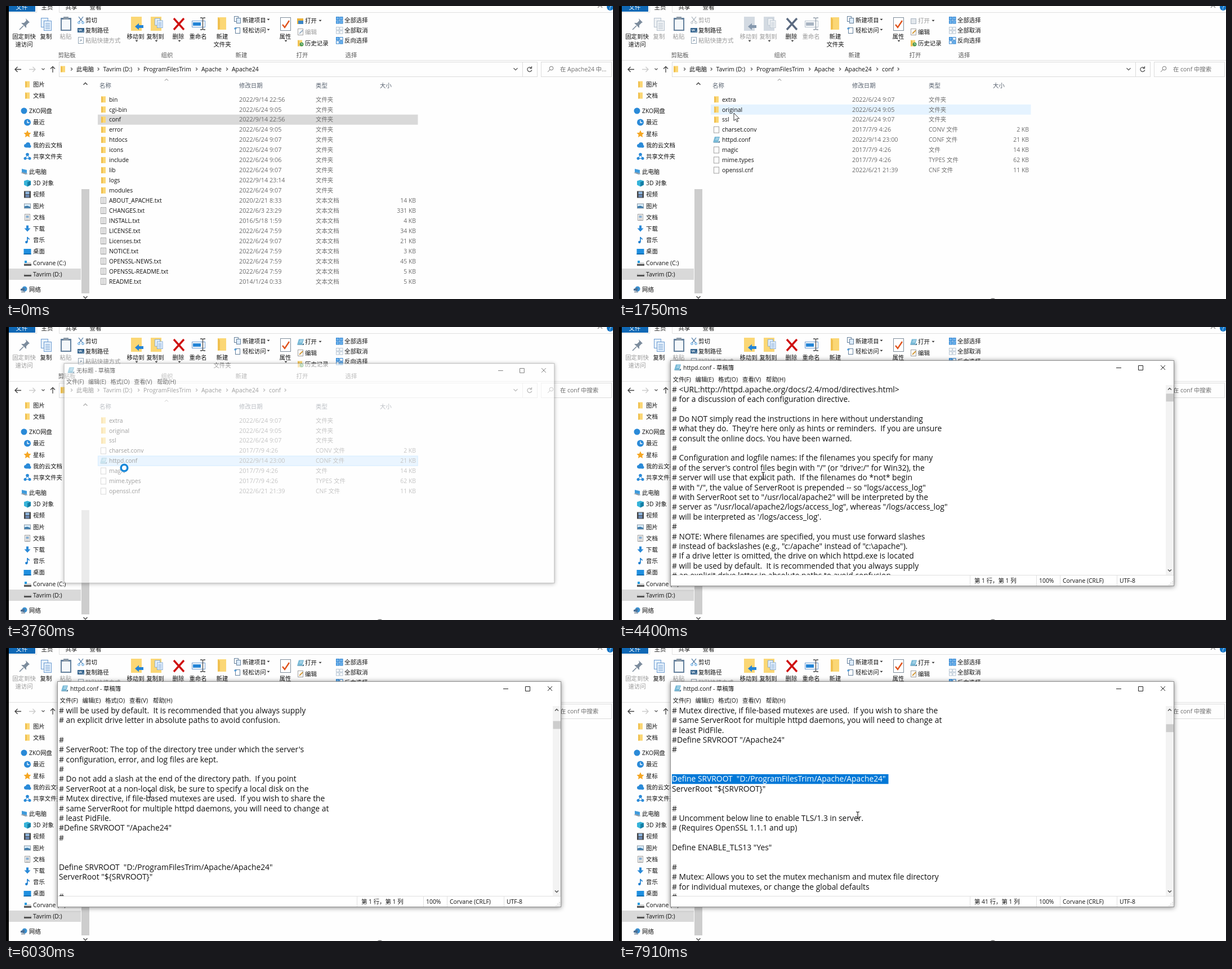
An HTML page that plays this animation: 1078 px wide and 520 px high, repeating every 8000 ms.

```html
<!DOCTYPE html>
<html lang="zh-CN">
<head>
<meta charset="utf-8">
<style>
html, body { margin: 0; width: 100%; height: 100%; overflow: hidden; background: #fefefe; }
svg { display: block; }
text { font: 10.4px "Open Sans", "Noto Sans CJK SC", "Noto Sans CJK", sans-serif; white-space: pre; }
.date { font-size: 10.8px; }
.code text { font-size: 13.85px; }
.shadow { filter: drop-shadow(0 1px 4px #0007); }
</style>
</head>
<body>
<svg width="1078" height="520" viewBox="0 0 1078 520">
  <g id="base"></g><g id="ribbon"></g><g id="files"></g>
  <g id="arrows"></g><g id="pad"></g><g id="cursor"></g>
</svg>
<script>
const INK = '#111', GREY = '#6d6d6d', DIM = '#9a9a9a', BLUE = '#2a8ad8', GOLD = '#fbd775';

// SVG helpers; text is placed by the middle of its capitals
const esc = s => s.replace(/&/g, '&amp;').replace(/</g, '&lt;');
const T = (x, y, s, fill = INK, more = '') => `<text x="${x}" y="${y + 3.8}" fill="${fill}" ${more}>${esc(s)}</text>`;
const C = (x, y, s, fill) => T(x, y, s, fill, 'text-anchor="middle"');
const R = (x, y, w, h, fill, more = '') => `<rect x="${x}" y="${y}" width="${w}" height="${h}" fill="${fill}" ${more}/>`;
const B = (x, y, w, h, stroke, fill = 'none') => R(x + .5, y + .5, w - 1, h - 1, fill, `stroke="${stroke}"`);
const P = (d, stroke, w = 1, fill = 'none') => `<path d="${d}" stroke="${stroke}" stroke-width="${w}" fill="${fill}"/>`;
const F = (d, fill) => `<path d="${d}" fill="${fill}"/>`;
const O = (x, y, r, fill, more = '') => `<circle cx="${x}" cy="${y}" r="${r}" fill="${fill}" ${more}/>`;
const at = (x, y, s, more = '') => `<g transform="translate(${x} ${y})${more}">${s}</g>`;
const chevron = (x, y, turn, size = 3, color = '#555', w = 1.2) =>
  at(x, y, P(`M${-size / 2} ${-size}L${size / 2} 0L${-size / 2} ${size}`, color, w), ` rotate(${turn})`);
const drop = (x, y, fill = '#333') => F(`M${x - 2.5} ${y - 1.2}h5l-2.5 2.7z`, fill);

const folder = R(-4, -5.5, 8, 11, GOLD) + F('M-4 -5.5l3 1.5v9l-3 .5z', '#f0c050');
const page = B(-5, -6, 10, 12, '#a0a0a0', '#fff');
const lined = page + P('M-3 -3.5h6M-3 -1.5h6M-3 .5h6M-3 2.5h6M-3 4.5h6', '#a8a8a8', .8);
const notebook = F('M-3 -5.5h9l-3 10h-9z', '#78b9d6') + F('M-6 4.5l9 0 3 -3v3.500h-10z', '#426f8c') + P('M-1 -3h5M-2 -.5h5', '#d9f0fa');
const cloud = O(-3, 1, 3, BLUE) + O(1, -1, 4, BLUE) + O(4, 2, 2.5, BLUE) + R(-3, 0, 7, 4.3, BLUE);
const disk = F('M-6 1l2 -3h9l2 3v3h-13z', '#555') + F('M-6 1l2 -3h9l2 3z', '#d4d4d4');
const icons = {
  folder, cloud,
  dot: O(0, 0, 5.5, BLUE),
  clock: O(0, 0, 6, BLUE) + P('M0 -3.5v4h3.500', '#fff', 1.3),
  star: F('M0 -6.500l2 4.300 4.500 .5-3.300 3.200.9 4.600-4.100-2.300-4.100 2.300.9-4.600-3.300-3.200 4.500-.5z', '#f5a623'),
  share: O(0, -3.5, 2.8, BLUE) + O(-4, 3.5, 2.5, BLUE) + O(4, 3.5, 2.5, BLUE) + P('M0 -3l-4 6.500h8z', BLUE),
  pc: F('M-4 -5l9 2v6l-9 -2z', '#3f9bdc') + F('M-6 2l4 -1 9 3-4 1z', '#8a98a5'),
  cube: F('M0 -6l6 2v7l-6 3-6 -3v-7z', '#36b3d9') + F('M0 -2l6 -2v7l-6 3z', '#157fa5'),
  film: R(-6, -6, 12, 12, '#444') + R(-3.5, -5, 7, 4.5, '#8fb7e0') + R(-3.5, .5, 7, 4.5, '#6c8ab5'),
  pic: B(-6, -4.5, 12, 9, '#8d9aa5', '#d8ecfa') + F('M-5 3.500l0 -3 5 -1 5 2v2z', '#3a78a8'),
  doc: lined + R(-2.5, -2.5, 5, 3, '#78a7d2'),
  down: F('M-2 -5.500h4v5h3.500l-5.500 6-5.500 -6h3.500z', BLUE),
  note: P('M0 4v-9q1 3 4 4', '#1e7fd0', 1.6) + O(-1.7, 4, 2.2, '#1e7fd0'),
  desk: R(-6.5, -4.5, 13, 10, '#1f8fe0') + R(-6.5, 4, 13, 1.5, '#0b5f9f'),
  system: at(0, 1, disk) + R(-5, -4, 4, 4, '#1f9be0'),
  disk,
  net: O(1, -1, 4.5, '#3a90d0') + F('M-6 -1l7 -2v6l-7 -1z', '#4b6f94') + P('M-5 4.500h7', '#6d7f90', 1.500)
};

const sidebar = [
  ['folder', '图片', 139], ['folder', '文档', 159], ['dot', 'ZKO网盘', 186, 'open'],
  ['clock', '最近', 206.5, 'sub'], ['star', '星标', 227, 'sub'], ['cloud', '我的云文档', 247, 'sub'],
  ['share', '共享文件夹', 267, 'sub'], ['pc', '此电脑', 294, 'open'], ['cube', '3D 对象', 314.5, 'sub'],
  ['film', '视频', 334.5, 'sub'], ['pic', '图片', 355, 'sub'], ['doc', '文档', 375, 'sub'],
  ['down', '下载', 395, 'sub'], ['note', '音乐', 415, 'sub'], ['desk', '桌面', 435.5, 'sub'],
  ['system', 'Corvane (C:)', 456, 'sub'], ['disk', 'Tavrim (D:)', 476, 'sub'], ['net', '网络', 503, 'top']
];

const listing = s => s.trim().split('\n').map(row => row.split('|'));
const rootFiles = listing(`
bin|2022/9/14 22:56
cgi-bin|2022/6/24 9:05
conf|2022/9/14 22:56
error|2022/6/24 9:05
htdocs|2022/6/24 9:07
icons|2022/6/24 9:07
include|2022/6/24 9:06
lib|2022/6/24 9:07
logs|2022/9/14 23:14
modules|2022/6/24 9:07
ABOUT_APACHE.txt|2020/2/21 8:33|文本文档|14
CHANGES.txt|2022/6/3 23:29|文本文档|331
INSTALL.txt|2016/5/18 1:59|文本文档|4
LICENSE.txt|2022/6/24 7:59|文本文档|34
Licenses.txt|2022/6/24 9:07|文本文档|21
NOTICE.txt|2022/6/24 7:59|文本文档|3
OPENSSL-NEWS.txt|2022/6/24 7:59|文本文档|45
OPENSSL-README.txt|2022/6/24 7:59|文本文档|5
README.txt|2014/1/24 0:33|文本文档|5`);
const confFiles = listing(`
extra|2022/6/24 9:07
original|2022/6/24 9:05
ssl|2022/6/24 9:07
charset.conv|2017/7/9 4:26|CONV 文件|2
httpd.conf|2022/9/14 23:00|CONF 文件|21
magic|2017/7/9 4:26|文件|14
mime.types|2017/7/9 4:26|TYPES 文件|62
openssl.cnf|2022/6/21 21:39|CNF 文件|11`);

const lines = String.raw`#
#
# This is the main Apache HTTP server configuration file.  It contains the
# configuration directives that give the server its instructions.
# See <URL:http://httpd.apache.org/docs/2.4/> for detailed information.
# In particular, see
# <URL:http://httpd.apache.org/docs/2.4/mod/directives.html>
# for a discussion of each configuration directive.
#
# Do NOT simply read the instructions in here without understanding
# what they do.  They're here only as hints or reminders.  If you are unsure
# consult the online docs. You have been warned.
#
# Configuration and logfile names: If the filenames you specify for many
# of the server's control files begin with "/" (or "drive:/" for Win32), the
# server will use that explicit path.  If the filenames do *not* begin
# with "/", the value of ServerRoot is prepended -- so "logs/access_log"
# with ServerRoot set to "/usr/local/apache2" will be interpreted by the
# server as "/usr/local/apache2/logs/access_log", whereas "/logs/access_log"
# will be interpreted as '/logs/access_log'.
#
# NOTE: Where filenames are specified, you must use forward slashes
# instead of backslashes (e.g., "c:/apache" instead of "c:\apache").
# If a drive letter is omitted, the drive on which httpd.exe is located
# will be used by default.  It is recommended that you always supply
# an explicit drive letter in absolute paths to avoid confusion.

#
# ServerRoot: The top of the directory tree under which the server's
# configuration, error, and log files are kept.
#
# Do not add a slash at the end of the directory path.  If you point
# ServerRoot at a non-local disk, be sure to specify a local disk on the
# Mutex directive, if file-based mutexes are used.  If you wish to share the
# same ServerRoot for multiple httpd daemons, you will need to change at
# least PidFile.
#Define SRVROOT "/Apache24"
#


Define SRVROOT  "D:/ProgramFilesTrim/Apache/Apache24"
ServerRoot "${'$'}{SRVROOT}"

#
# Uncomment below line to enable TLS/1.3 in server.
# (Requires OpenSSL 1.1.1 and up)

Define ENABLE_TLS13 "Yes"

#
# Mutex: Allows you to set the mutex mechanism and mutex file directory
# for individual mutexes, or change the global defaults
#`.split('\n');
const PICKED = 40, PITCH = 17.38;

function drawBase() {
  const side = sidebar.map(([icon, label, y, level]) => {
    const x = level == 'open' || level == 'top' ? 32 : 38;
    return at(x, y, icons[icon]) + T(x + (x < 38 ? 9 : 10), y, label);
  }).join('');
  return R(0, 0, 1078, 520, '#fefefe') + R(0, 0, 5, 520, '#000')
    + R(5, 0, 47, 10, '#0f68b5') + C(28, 2, '文件', '#fff') + C(73, 2, '主页') + C(116, 2, '共享') + C(159, 2, '查看')
    + P('M5 11.5H54.500V0M94.500 0V11.500H1078M5 96.500H1078', '#e0e0e0')
    + chevron(1055, 1, -90, 4, '#888') + O(1073, 2, 6, '#1173c4') + C(1073, 2, '?', '#fff')
    // address row
    + P('M27 112.500H16M20.500 108l-4.500 4.500 4.500 4.500', '#444', 1.4)
    + P('M41 112.500H52M47.500 108l4.500 4.500-4.500 4.500', '#ccc', 1.4)
    + chevron(66, 112, 90, 2.5) + P('M83 118V107.500M79 111.500l4-4 4 4', '#444', 1.3)
    + B(94, 99, 824, 27, '#dcdcdc') + B(917, 99, 27, 27, '#dcdcdc') + B(950, 99, 126, 27, '#dcdcdc')
    + at(101, 112, folder) + chevron(905, 112, 90, 3.5) + P('M933 110a4 4 0 1 0 .8 3.500M933.500 107v3.500h-3.500', '#555', 1.3)
    + O(968.5, 110.5, 3.3, 'none', 'stroke="#777"') + P('M966 113l-4 4', '#777')
    // column heads
    + [[166, '名称'], [414, '修改日期'], [550, '类型'], [664, '大小']].map(([x, s]) => T(x, 141, s, '#56606e')).join('')
    + chevron(285, 131, -90, 3, '#777', 1)
    + R(5, 466, 128, 20, '#d9d9d9') + side
    + R(134, 325, 14, 185, '#cdcdcd') + chevron(141, 138, -90, 3.5, '#444', 1.5) + chevron(141, 517, 90, 3.5, '#444', 1.5);
}

// sel: 'folder', 'file' or '' for no selection
function drawRibbon(sel) {
  const on = sel ? INK : DIM, any = (a, b) => sel ? a : b;
  const edge = any('#6c9bd0', '#b4c0cc'), sheet = any('#e6f1fc', '#eef1f4'), yellow = any(GOLD, '#d3dae2');
  const sheets = (x, y, k) => at(x, y, B(-9, -11, 13, 17, edge, sheet) + B(-4, -6, 14, 18, edge, sheet)
    + P('M-1 -1h8M-1 2h8M-1 5h8M-1 8h8', edge), ` scale(${k})`);
  const pin = sel == 'file' ? DIM : INK;
  const cells = (y, a, b) => [0, 1, 2, 3].map(i =>
    B(586 + i % 2 * 6.5, y - 6 + (i >> 1) * 6.5, 6, 6, a, i % 3 ? b : a == '#b5c4d2' ? 'none' : '#6db3ee')).join('');
  const openIcon = sel == 'file' ? notebook : sel ? R(-6, -5, 11, 10, '#e8b23c') + R(-4, -1, 9, 6, '#3b86c8')
    : B(-5, -5, 10, 10, '#a9b4c0', '#e2e7ec');
  return F('M35 22l7 7-2 1-4 4v5l-9-9h5l4-4z', '#7c8c9d') + P('M31 35l-7 7', '#7c8c9d', 1.6)
    + C(32, 54, '固定到快', pin) + C(32, 68, '速访问', pin)
    + sheets(71, 32, 1) + C(71, 54, '复制', on)
    + R(97, 21, 19, 23, '#64809c') + R(99, 24, 15, 18, '#f4f8fb') + R(102, 19, 9, 5, '#8b99a7') + C(106, 54, '粘贴', DIM)
    + P('M129 19l7 9M137 19l-7 9', any('#3f6d9b', '#a5afb9'), 1.2)
    + [129.5, 136.5].map(x => O(x, 29.5, 1.8, 'none', `stroke="${any(BLUE, '#a5afb9')}"`)).join('')
    + T(141, 25, '剪切', on)
    + R(127, 39, 12, 8, '#35658f') + P('M129 41l1.500 4 1.500-4 1.500 4 1-4M136 45h2', '#fff', .8) + T(141, 43, '复制路径')
    + B(128, 55, 10, 12, '#93a5b5', '#fff') + P('M131 63l3-3h-2M134 60v2', '#7d92a6') + T(141, 61, '粘贴快捷方式', DIM)
    + R(222, 19, 19, 25, yellow) + F('M244 34v5h-8v3.500l-7-6 7-6v3.500z', any('#2484d6', '#8598ad'))
    + C(230, 54, '移动到', on) + drop(232, 62)
    + R(257, 19, 19, 25, yellow) + sheets(271, 30, .75) + C(265, 54, '复制到', on) + drop(267, 62)
    + P('M298 22l18 20M316 22l-18 20', any('#cf1010', '#5b6a80'), 3.4) + C(306, 54, '删除') + drop(308, 62)
    + B(330, 26, 24, 12, edge, '#fff') + R(332, 29, 14, 6, any('#2484d6', '#a8b4c2'))
    + P('M345 21h3l1.500 1 1.500-1h3M349.500 22v19M345 42h3l1.500-1 1.500 1h3', any('#444', '#8f9aa6'), 1.3) + C(341, 54, '重命名', on)
    + R(376, 20, 15, 22, GOLD) + F('M376 20l4 3v18l-4 1z', '#f0c050') + C(384, 54, '新建') + C(384, 68, '文件夹')
    + B(405, 18, 8, 10, '#64809c', '#fff') + B(409, 21, 8, 10, '#64809c', '#dcecfa') + T(420, 25, '新建项目') + drop(466, 24)
    + B(407, 38, 9, 11, '#64809c', '#fff') + P('M405 40h5M407 38v4', BLUE) + T(420, 43, '轻松访问') + drop(466, 42)
    + B(487, 20, 19, 24, '#7f8d9b', '#fff') + P('M491 33l4 5 8-12', '#e0521b', 2.4) + C(496, 54, '属性') + drop(497, 62)
    + at(523, 27, openIcon) + T(531, 26, '打开', on) + drop(558, 26)
    + at(523, 46, page) + P('M521 49l6-6', sel == 'folder' ? '#9bb0c4' : '#d29a3c', 2) + T(531, 46, '编辑', sel == 'folder' ? DIM : INK)
    + at(522, 66, folder) + O(525, 68, 3.5, '#4c9a52') + P('M525 66v2h2', '#fff', .8) + T(531, 66, '历史记录')
    + cells(25, '#2f83d0', '#6db3ee') + cells(43, '#b5c4d2', 'none') + cells(61, '#2f83d0', '#fff')
    + T(601, 25, '全部选择') + T(601, 43, '全部取消') + T(601, 61, '反向选择')
    + [[108, '剪贴板'], [286, '组织'], [418, '新建'], [526, '打开'], [613, '选择']].map(([x, s]) => C(x, 87, s, '#555')).join('');
}

const rowTop = i => 156.8 + 17.94 * i;

function drawFiles(inConf, picked, hover, framed) {
  const crumbs = [[125, '此电脑'], [172.5, 'Tavrim (D:)'], [244, 'ProgramFilesTrim'], [347, 'Apache'], [401, 'Apache24']];
  if (inConf) crumbs.push([467, 'conf']);
  const mark = (i, fill, line) => i < 0 ? '' : R(163, rowTop(i), 568.5, 18, fill)
    + (line ? R(163.5, rowTop(i) + .5, 567.5, 17, 'none', 'stroke="#99d1ff"') : '');
  const rows = (inConf ? confFiles : rootFiles).map(([name, date, kind, size], i) => {
    const y = rowTop(i) + 9;
    const icon = !kind ? folder : name == 'httpd.conf' ? notebook : inConf ? page : lined;
    return at(173, y, icon) + T(183, y, name) + T(414, y, date, GREY, 'class="date"') + T(550, y, kind || '文件夹', GREY)
      + (size ? T(728, y, size + ' KB', GREY, 'text-anchor="end"') : '');
  }).join('');
  return crumbs.map(([x, s]) => chevron(x - 8.5, 112, 0, 2.5) + T(x, 112, s)).join('')
    + (inConf ? chevron(496, 112, 0, 2.5) : '')
    + T(984, 112, inConf ? '在 conf 中搜索' : '在 Apache24 中...', GREY)
    + (hover == picked ? '' : mark(hover, '#e5f3ff'))
    + mark(picked, hover == picked ? '#cce8ff' : '#d9d9d9', framed && hover == picked) + rows;
}

const drawArrows = () => sidebar.map(([, , y, level]) =>
  level == 'open' ? chevron(14.5, y, 90, 3.5, '#666') : level ? chevron(level == 'sub' ? 21.5 : 14.5, y, 0, 3.5, '#aaa') : '').join('');

function drawPad(loaded, top, selX) {
  const y0 = i => 111 + (i - top) * PITCH;
  const body = top < 0 ? '' : lines.slice(top, top + 20).map((s, i) => T(94, y0(top + i) + 1, s)).join('');
  const sy = y0(PICKED);
  const picked = selX == null ? '' : `<clipPath id="pick">${R(selX, sy - 9, 479 - selX, 18)}</clipPath>`
    + `<g clip-path="url(#pick)">${R(selX, sy - 8.7, 478.5 - selX, 17.4, '#0078d7') + T(94, sy + 1, lines[PICKED], '#fff')}</g>`;
  const menu = [[95.5, '文件(F)'], [135.5, '编辑(E)'], [176, '格式(O)'], [219, '查看(V)'], [261, '帮助(H)']];
  const foot = [[631, selX == null ? '第 1 行，第 1 列' : '第 41 行，第 1 列'], [746, '100%'], [788, 'Corvane (CRLF)'], [889, 'UTF-8']];
  const put = list => list.map(([x, s, y = 93]) => T(x, y, s)).join('');
  return `<g class="shadow">${B(91, 59, 895, 401, '#8f8f8f', '#fff')}</g>`
    + at(104, 72, notebook) + T(114, 72, (loaded ? 'httpd.conf' : '无标题') + ' - 草稿簿') + put(menu)
    + P('M883 72.500h9M922.500 68.500h8v8h-8zM962 68l8 8M970 68l-8 8', '#222')
    + (!loaded ? '' : R(971, 103, 14, 337, '#f3f3f3') + R(971.5, 114.5 + .63 * Math.max(top, 0), 13.5, 14, '#cdcdcd')
      + chevron(978, 110, -90, 3, '#555', 1.5) + chevron(978, 432, 90, 3, '#555', 1.5)
      + P('M92 440.500H985M623.500 441V459M741.500 441V459M783.500 441V459M884.500 441V459', '#e0e0e0')
      + put(foot.map(([x, s]) => [x, s, 450])) + P('M983 451v1M980 454v1M983 454v1M977 457v1M980 457v1M983 457v1', '#aaa', 1.3)
      + `<clipPath id="view">${R(92, 102, 879, 338)}</clipPath><g class="code" clip-path="url(#view)">${body + picked}</g>`);
}

const cursors = {
  arrow: P('M0 0V13.500L3.200 10.600 5.400 15.600 7.500 14.700 5.300 9.800H9.600Z', '#222', .9, '#fff'),
  busy: O(0, 0, 8, '#fff') + O(0, 0, 5.8, 'none', 'stroke="#1787d8" stroke-width="3.6"'),
  beam: P('M-3 -6h2l1 1 1-1h2M0 -5v10M-3 6h2l1-1 1 1h2', '#111', 1.1)
};

// Keyframes hold until the next one: [time, ...values]
const pointer = [
  [0, -50, -50], [130, 845, 500], [250, 520, 340], [370, 205, 195], [1000, 203, 198], [1500, 204, 190],
  [2130, 205, 204], [2250, 207, 226], [2380, 208, 245], [3640, 210, 250], [4010, 256, 264], [4670, 256, 259],
  [6140, 256, 254], [6260, 262, 264], [6390, 276, 284], [6510, 296, 308], [6640, 314, 332], [6770, 327, 347],
  [6900, 420, 330], [7020, 540, 322], [7150, 482, 386], [7290, 250, 388], [7410, 3, 390], [7530, 200, 360], [7660, 424, 297]
];
const scroll = [[0, -1], [4150, 0], [4270, 3], [4400, 6], [4900, 9], [5040, 12], [5160, 15], [5280, 18],
  [5410, 21], [5530, 24], [7660, 27], [7790, 30], [7910, 33]];
const opening = [[0, 0, 1], [3640, .25, .95], [3760, .6, .974], [3880, .9, .993], [4010, 1, 1]];
const hold = (keys, t) => keys.findLast(k => k[0] <= t).slice(1);
const clamp = v => Math.min(1, Math.max(0, v));

const layer = id => document.getElementById(id), shown = {};
function show(id, html) {
  if (shown[id] !== html) layer(id).innerHTML = shown[id] = html;
}

function render(t) {
  const [x, y] = hold(pointer, t), [top] = hold(scroll, t), [alpha, scale] = hold(opening, t);
  const inConf = t >= 1500, clicked = t >= 3260;
  const row = Math.floor((y - rowTop(0)) / 17.94);
  const hover = x > 163 && x < 731 && row >= 0 && row < (inConf ? 8 : 19) ? row : -1;
  show('ribbon', drawRibbon(!inConf ? 'folder' : clicked ? 'file' : ''));
  show('files', drawFiles(inConf, !inConf ? 2 : clicked ? 4 : -1, clicked ? 4 : hover, t >= 510)
    + (t >= 1000 ? `<ellipse cx="664" cy="520.5" rx="4" ry="2" fill="#777"/>` : ''));
  layer('arrows').setAttribute('opacity', Math.min(clamp((t - 510) / 350), clamp((1750 - t) / 250)));
  const selX = t < 7290 ? null : t < 7410 ? 250 : 94;
  show('pad', alpha ? drawPad(t >= 4010, top, selX) : '');
  layer('pad').setAttribute('opacity', alpha);
  layer('pad').setAttribute('transform', `translate(538.5 260) scale(${scale}) translate(-538.5 -260)`);
  show('cursor', at(x, y, cursors[t < 3640 ? 'arrow' : t < 4010 ? 'busy' : 'beam']));
}

show('base', drawBase());
show('arrows', drawArrows());
const start = performance.now();
(function tick() {
  render((performance.now() - start) % 8000);
  requestAnimationFrame(tick);
})();
</script>
</body>
</html>
```
